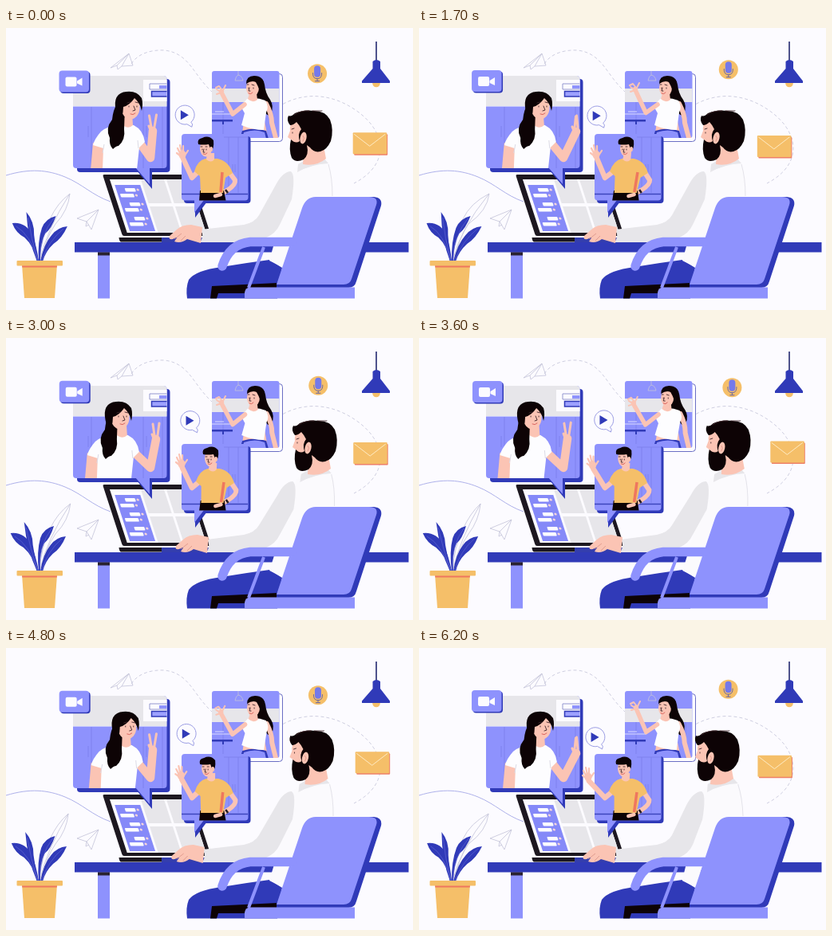
Write an HTML page that moves like this. It is 510 by 354 pixels and loops after 6300 ms.

```html
<!DOCTYPE html>
<html lang="en">
<head>
<meta charset="utf-8">
<title>Video call</title>
<style>
html, body { margin: 0; width: 100%; height: 100%; overflow: hidden; background: #fcfbff; }
svg { display: block; width: 510px; height: 354px; }
.lilac { fill: #8e92fd; }
.navy { fill: #303ab8; }
.grey { fill: #e7e6ea; }
.white { fill: #fcfbff; }
.skin { fill: #fbc4b4; }
.hair { fill: #0d0305; }
.gold { fill: #f5bf69; }
.line { fill: none; stroke: #c3c3d8; stroke-width: .8; }
.dash { stroke-dasharray: 4 3; }
.seam { fill: none; stroke: #7b7fea; stroke-width: .8; }
.ink { fill: none; stroke: #40262b; stroke-width: .9; stroke-linecap: round; }
.limb { fill: none; stroke: #fbc4b4; stroke-linecap: round; stroke-linejoin: round; }
.mouth { fill: none; stroke: #db655f; stroke-width: 1; stroke-linecap: round; }
</style>
</head>
<body>
<svg viewBox="0 0 510 354">
  <defs>
    <clipPath id="clipA"><path d="M80 50H210V176H80Z"/></clipPath>
    <clipPath id="clipB"><path d="M250 50H350V138H250Z"/></clipPath>
    <clipPath id="clipC"><path d="M195 130H310V216.500H195Z"/></clipPath>
  </defs>

  <!-- trails and paper planes -->
  <path d="M0 185C30 176 52 178 74 187S108 210 131 218" fill="none" stroke="#aeb1ea"/>
  <path class="line dash" d="M157 45C165 32 182 27 199 28C230 32 234 58 258 80"/>
  <path class="line dash" d="M341 99C374 78 409 84 435 101C476 127 484 170 436 195"/>
  <path class="line" d="M131 50L154 32L159 47L145 48L140 52L139 47ZM139 47L154 32L145 48"/>
  <path class="line" d="M89 239L116 228L107 253L101 243ZM101 243L116 228M101 243L100 249L104 247"/>

  <!-- lamp -->
  <circle class="gold" cx="464" cy="69.500" r="4.800"/>
  <path d="M464 17V41" stroke="#303478" stroke-width="1.700"/>
  <path class="navy" d="M459.500 42Q464 38 469 42V51L481 66.500V69H446V66.500L459.500 51Z"/>

  <!-- floating icons -->
  <g id="mic">
    <circle class="gold" cx="390" cy="57" r="12"/>
    <rect x="386" y="47" width="8" height="14.500" rx="4" fill="#7479ea"/>
    <path d="M384.500 56V58Q385 63.500 390 63.500T395.500 58V56M390 63.500V66.500M387 66.500H393" fill="none" stroke="#5c5da8" stroke-width=".9"/>
  </g>
  <g id="mail">
    <rect x="436" y="133" width="42" height="26.500" rx="1" fill="#ee8068"/>
    <rect class="gold" x="434.500" y="131" width="42.500" height="27" rx="1"/>
    <path d="M436 133L455.500 148L475 133" fill="none" stroke="#fff0cd" stroke-width=".9"/>
  </g>

  <!-- laptop -->
  <g transform="translate(0 184) skewX(18)">
    <rect x="121" width="111" height="77" rx="2" fill="#1d1820"/>
    <rect class="white" x="128" y="6" width="99" height="67"/>
    <rect x="132" y="13" width="32" height="58" fill="#8589f8"/>
    <path class="grey" d="M167 6H196V36H167ZM199 6H227V36H199ZM167 40H196V73H167ZM199 40H227V73H199Z"/>
    <g id="chat"></g>
  </g>

  <!-- left call -->
  <rect class="navy" x="89" y="64" width="116.500" height="117" rx="4"/>
  <path class="navy" d="M163 178H183V202Z"/>
  <rect class="lilac" x="84" y="60" width="117.500" height="116" rx="4"/>
  <path class="lilac" d="M162 175H180V196Z"/>
  <path class="grey" d="M84 64Q84 60 88 60H197.500Q201.500 60 201.500 64V98.500H84Z"/>
  <path class="white" d="M172 65H201.500V92H172Z"/>
  <path d="M180 70H201.500M180 70V77H201.500" stroke="#9497cf" fill="none"/>
  <path class="lilac" d="M192 72H201.500V76H192Z"/>
  <path d="M201.500 79.500H182.500V86H201.500" fill="#9da1ff" stroke="#303ab8" stroke-width="1.500"/>
  <path d="M84 98.500H201" stroke="#c5c8ff"/>
  <path class="seam" d="M107 99V176M172 99V176M196 99V176M103 123V137M176 123V137"/>
  <g clip-path="url(#clipA)">
    <path id="armA" class="limb" stroke-width="10.500"/>
    <path id="fingersA" class="limb" stroke-width="3"/>
    <g id="torsoA">
      <path class="skin" d="M109 144L123 148L122 178H106Z"/>
      <path fill="#fdfdff" d="M145 120Q127 123 119 130Q111 139 109 147L122 151L121 178H164L167 150L174 143Q172 128 160 122Z"/>
      <path d="M123 146L121 157M166 151L165 141" stroke="#dcdbe5" fill="none"/>
      <path class="skin" d="M145 107H158L159 122Q153 128 145 121Z"/>
    </g>
    <path id="tailA" class="hair" d="M140 93Q134 103 133 115Q124 126 130 138Q129 147 134 152Q138 148 141 148Q150 140 148 127Q148 113 150 99Z"/>
    <g id="headA">
      <ellipse class="skin" cx="156" cy="100" rx="11.500" ry="14.500"/>
      <path class="hair" d="M139 109Q132 85 147 80.500Q163 77 170 88Q172 95 170 104Q168 94 161 88Q155 97 147 99Q147 106 145 112Z"/>
      <path class="ink" d="M152 94L156 93M162 93L166 94M154 98V99M164 98V99M160 98L162 103L159 104"/>
      <path class="mouth" d="M156 108Q159 110 162 107"/>
    </g>
  </g>
  <g id="cam">
    <rect class="navy" x="67.500" y="54.500" width="37.500" height="27" rx="4"/>
    <rect class="lilac" x="66" y="53" width="37.500" height="27" rx="4"/>
    <rect class="white" x="74" y="61" width="14" height="12" rx="2"/>
    <path class="white" d="M88.500 66L95 62V72L88.500 69Z"/>
  </g>

  <g id="play">
    <path fill="#fcfbff" stroke="#9092e0" stroke-width=".9" d="M232 117Q235 119 233 123L227 119.500A12 12 0 1 1 232 117Z"/>
    <path class="navy" d="M219 102L229 108L219 114Z"/>
  </g>

  <!-- right call -->
  <rect x="262.500" y="57.500" width="84" height="85" rx="4" fill="#fcfbff" stroke="#6a6ec4"/>
  <rect class="lilac" x="258" y="54" width="84.500" height="84" rx="3"/>
  <path class="grey" d="M258 76H342.500V93H258Z"/>
  <path class="seam" d="M272 93V138M334 93V138"/>
  <path class="line" d="M291 54V59M287 66Q288 60 291 59Q296 60 297 66Z"/>
  <path d="M258 108H285M262 105H273" stroke="#dbdcff" fill="none"/>
  <path class="navy" d="M258 115H284V117.500H273V121H271V117.500H258Z"/>
  <g clip-path="url(#clipB)">
    <path id="hairB" class="hair" d="M311 63Q322 59 324 71Q325 82 331 90Q336 98 332 107Q328 114 323 102L311 89Z"/>
    <g id="torsoB">
      <path class="limb" stroke-width="6" d="M326 95Q333 108 333 119L338 138"/>
      <path class="skin" d="M298 117H324L327 132H296Z"/>
      <path class="navy" d="M296 129Q311 124 326 129L329 139H293Z"/>
      <path class="lilac" d="M298 131Q312 126 324 131L326 139H296Z"/>
      <path fill="#fdfdff" d="M302 89Q313 86 325 91Q330 99 326 106L323 128Q309 128 295 122L299 107L294 98Z"/>
      <path class="skin" d="M305 82H314L315 90Q309 95 303 89Z"/>
    </g>
    <path id="armB" class="limb" stroke-width="5.500"/>
    <g id="palmB">
      <circle class="skin" cx="270" cy="80" r="3.200"/>
      <path class="limb" stroke-width="2" d="M271 78L267 73L263 75M270 81L264 77M270 81L264 83M272 78L275 72"/>
    </g>
    <g id="headB">
      <ellipse class="skin" cx="309" cy="75" rx="8" ry="11"/>
      <path class="hair" d="M301 70Q301 60 311 60Q323 60 323 72L319 88Q319 78 313 68Q308 65 301 70Z"/>
      <path class="ink" stroke-width=".8" d="M302 71H304M308 71L311 72M304 75V76M310 75V76M305 75L304 79H306"/>
      <path class="mouth" d="M304 82Q307 84 309 81"/>
    </g>
  </g>

  <!-- middle call -->
  <rect class="navy" x="223" y="136" width="83.500" height="84" rx="4"/>
  <path class="navy" d="M237 218H252L237 238Z"/>
  <rect class="lilac" x="220" y="133" width="83.500" height="83.500" rx="4"/>
  <path class="lilac" d="M236 216H248L236 232Z"/>
  <path class="seam" d="M273 137H303M279 137V207M291 137V207M284 171V181M287 171V181"/>
  <path d="M220 208.500H303" stroke="#3d45bd" stroke-width="1.500"/>
  <g clip-path="url(#clipC)">
    <path id="armC" class="limb" stroke-width="6.500"/>
    <g id="palmC">
      <ellipse class="skin" cx="221" cy="159" rx="4.500" ry="5.500"/>
      <path class="limb" stroke-width="2.200" d="M218 157L215 151M220 156L218 147M222 156L222 148M224 160L228 154M218 160L214 157"/>
    </g>
    <g id="torsoC">
      <path class="limb" stroke-width="6" d="M279 180L287 191Q288 197 277 204L266 210"/>
      <path class="hair" d="M243 204H273L276 219H242Z"/>
      <path class="gold" d="M250 164Q240 166 236 180L243 186L244 207H272L275 188L284 182Q279 167 265 164Z"/>
      <path d="M271 181L269 206" stroke="#ef775e" stroke-width="3.500"/>
      <path class="skin" d="M252 157H261V165Q257 170 251 165Z"/>
      <path class="limb" stroke-width="4.500" d="M262 211L269 209"/>
      <path d="M275 203L278 207" stroke="#231d27" stroke-width="2.500"/>
    </g>
    <g id="headC">
      <ellipse class="skin" cx="250.500" cy="151" rx="7.500" ry="10.500"/>
      <path class="hair" d="M241 146Q239 139 246 138Q254 134 260 141Q261 151 257 155L254 146Q247 147 241 146Z"/>
      <ellipse class="skin" cx="257" cy="152" rx="2" ry="3"/>
      <path class="ink" stroke-width=".8" d="M244 149H246M250 149H252M246 152V153M251 152V153M248 152L247 156H249"/>
      <path class="mouth" d="M247 158Q250 160 252 157"/>
    </g>
  </g>

  <!-- plant -->
  <path id="leafLine" class="line"/>
  <g id="leaves" class="navy">
    <path d="M39 293Q35 273 24 263Q13 257 9 245Q26 243 34 260Q39 274 41 293Z"/>
    <path d="M39 293Q28 266 27 231Q37 243 36 260Q37 277 41 293Z"/>
    <path d="M41 293Q40 268 46 251Q51 239 64 236Q58 252 50 258Q43 270 43 293Z"/>
    <path d="M43 293Q48 271 58 260Q66 250 78 249Q71 264 60 271Q50 280 46 293Z"/>
    <path d="M14 249Q31 259 40 292M29 238Q32 264 40 292M61 239Q44 259 42 292M73 252Q54 267 45 292" fill="none" stroke="#6469d6" stroke-width=".6"/>
  </g>
  <path class="gold" d="M20 297H64L61 339H23Z"/>
  <path fill="#ef765f" d="M20 297H64L63.800 300.500H20.300Z"/>
  <rect class="gold" x="13.500" y="292" width="57.500" height="6.500" rx="1"/>

  <!-- desk -->
  <path class="lilac" d="M115 281H130V339.500H115Z"/>
  <path class="navy" d="M86 269H504.500V281.500H86Z"/>
  <path fill="#2a2230" d="M115 281.500H130V285.500H115Z"/>
  <path fill="#1d1820" d="M141.500 263H195V268.500H144Q142 268 141.500 263Z"/>
  <path fill="#343eae" d="M195 263H256V269H195Z"/>

  <!-- host -->
  <path class="navy" d="M346 301L330 291Q300 295 270 300Q238 304 229 316Q225 326 227 339.500H340Z"/>
  <path class="hair" d="M258 324L340 320V326H304V333H266L264 339.500H256Z"/>
  <g id="body">
    <path fill="#fbfafd" d="M360 178Q380 162 403 168Q409 183 409 217L370 240L346 300L330 292L345 238Z"/>
    <path class="grey" d="M366 171L376 165L398 163L404 170Q383 171 365 181Z"/>
    <path d="M404 171Q409 188 409 211" fill="none" stroke="#e4e3ea"/>
  </g>
  <path id="sleeve" class="grey"/>
  <g id="hand">
    <path class="skin" d="M246 250L232 247Q220 247 214 253L205 261Q203 266 209 265L215 262L211 268Q219 271 227 265L244 270Z"/>
    <path d="M211 265L220 258M219 267L225 261" stroke="#db9387" fill="none" stroke-width=".8"/>
  </g>
  <g id="head">
    <path class="skin" d="M374 143H397L401 164Q389 174 372 171Z"/>
    <path class="skin" d="M360 115Q355 122 356 129L353 137L357 140V153H380V115Z"/>
    <path class="hair" d="M356 122Q351 116 354 110Q357 112 362 107Q373 102 386 104Q400 104 406 115Q411 128 407 142Q402 153 394 155Q386 157 381 150L377 147Q380 159 373 165Q363 170 358 163Q354 153 357 140Q363 146 368 142Q365 133 370 127Q367 121 364 118Q360 122 356 122Z"/>
    <ellipse class="skin" cx="372.500" cy="138" rx="4" ry="7.500" transform="rotate(12 372.500 138)"/>
    <path class="ink" d="M358 127L361 126M359 131V132"/>
    <path d="M372 135Q375 138 372 142" fill="none" stroke="#dd9689" stroke-width=".9"/>
    <path class="ink" stroke="#0d0305" d="M361 109Q370 103 380 104M384 104L396 104"/>
  </g>

  <!-- chair -->
  <path class="navy" d="M392 212H461Q472 213 470 223L439 318Q437 326 429 326H339V318Z"/>
  <path class="lilac" d="M388 212H455Q467 212 464 222L433 315Q431 322 423 322H339L371 226Q376 212 388 212Z"/>
  <path d="M304 326L323 275" stroke="#8e92fd" stroke-width="4"/>
  <path d="M271 299Q280 271 306 268.500H358" fill="none" stroke="#8e92fd" stroke-width="11.500" stroke-linecap="round"/>
  <path class="lilac" d="M306 325.500H437V339.500H299V332Q300 325.500 306 325.500Z"/>
</svg>

<script>
const LOOP = 6300, CYCLE = 5100, STEP = 100;
const times = [0, 300, 800, 1100, 1700, 3000, 4200];
const keys = {
  head: [0, -4, -9, -7, 0, 6, 6],
  hand: [0, 0, 0, 1, 2, 8, 8],
  headA: [0, 2, -1, -2, -4, -13, -12],
  handAx: [184, 186, 195, 197, 197, 188, 185],
  handAy: [124, 125, 127, 127, 125, 122, 121],
  spread: [4.5, 3.5, 3, .5, .5, 4, 4],
  headB: [0, 0, -1, -1, 0, 1, 3],
  palmBx: [0, 0, 1, 2, 1, 0, -2],
  palmBy: [0, 0, -4, -5, -3, 1, 2],
  headC: [0, -1, 2, 6, 9, 6, 6],
  palmCx: [0, -1, -10, -9, 1, -1, -5],
  palmCy: [0, -3, 5, 3, 0, -1, 2]
};
const $ = id => document.getElementById(id);
const move = (id, x, y = 0) => $(id).setAttribute('transform', `translate(${x} ${y})`);
const draw = (id, d) => $(id).setAttribute('d', d);
// Shears a part sideways while its foot stays put.
const lean = (id, foot, k) => $(id).setAttribute('transform', `matrix(1 0 ${-k} 1 ${foot * k} 0)`);

// Periodic Hermite curve through the pose values.
function curve(v, p) {
  const n = times.length, idx = i => (i + n) % n;
  const time = i => times[idx(i)] + Math.floor(i / n) * CYCLE;
  const slope = i => (v[idx(i + 1)] - v[idx(i - 1)]) / (time(i + 1) - time(i - 1));
  let i = n - 1;
  while (times[i] > p) i--;
  const h = time(i + 1) - time(i), u = (p - time(i)) / h;
  const a = v[i], b = v[idx(i + 1)], e = u * u * (3 - 2 * u);
  return a + (b - a) * e + h * u * (1 - u) * (slope(i) * (1 - u) - slope(i + 1) * u);
}

function render(t) {
  const p = t % CYCLE, k = {};
  for (const name in keys) k[name] = curve(keys[name], p);
  const swing = peak => Math.cos((p - peak) / CYCLE * 2 * Math.PI);

  const mail = swing(4025), mic = swing(3850), play = swing(3500);
  move('mail', 9 * mail - 2, 1 - 3 * mail);
  move('mic', 2.5 * mic, 5.5 * mic);
  move('play', 2 + 5.5 * play, -.5 - 4.5 * play);
  move('cam', .5 + .5 * mic, .5 + .5 * mic);

  lean('leaves', 293, (-1.5 - 2.5 * swing(3700)) / 45);
  const tip = 82 - 6 * swing(4100);
  draw('leafLine', `M42 293Q44 262 55 240Q64 220 ${tip} 208Q${tip - 2} 229 62 246Q50 263 44 293M42 293Q51 253 ${tip} 208`);

  move('head', k.head);
  lean('body', 300, k.head / 210);
  move('hand', k.hand);
  const w = 244 + k.hand, s = k.head * .4;
  draw('sleeve', `M${357 + s} 180Q${347 + s} 180 ${338 + s} 197L317 235Q312 244 298 247L${w} 253Q${w + 5} 261 ${w - 1} 269H292Q333 269 343 247L${358 + s} 215Q${363 + s} 184 ${357 + s} 180Z`);

  const sway = k.headA * .55;
  move('headA', k.headA);
  move('tailA', k.headA * .7);
  move('torsoA', sway);
  const x = k.handAx, y = k.handAy, f = k.spread;
  draw('armA', `M${166 + sway} 142L181 163L${x} ${y + 5}`);
  draw('fingersA', `M${x - 2} ${y}L${x - f} ${y - 14}M${x + 2} ${y}L${x + f} ${y - 15}M${x - 3} ${y + 4}L${x - 5} ${y - 1}`);

  move('headB', k.headB);
  move('hairB', k.headB);
  lean('torsoB', 138, k.headB / 70);
  move('palmB', k.palmBx, k.palmBy);
  draw('armB', `M${299 + k.headB / 2} 96L${284 + k.palmBx * .3} ${108 + k.palmBy * .5}L${271 + k.palmBx} ${83 + k.palmBy}`);

  move('headC', k.headC);
  lean('torsoC', 217, k.headC / 110);
  move('palmC', k.palmCx, k.palmCy);
  draw('armC', `M${244 + k.headC * .4} 177L233 188L${222 + k.palmCx} ${164 + k.palmCy}`);
}

// Chat bubbles on the laptop.
$('chat').innerHTML = [0, 1, 2, 3, 4, 5].map(i => {
  const px = i % 2 ? 135 : 143, py = 17 + i * 7 + (i > 1) * 4 + (i > 3) * 4;
  const wide = i % 2 ? 17 : 13;
  return `<rect class="white" x="${px}" y="${py}" width="${wide}" height="4.500" rx="1"/>` +
    `<circle cx="${px + wide + 3}" cy="${py + 2}" r="1.600" fill="#f7d5da"/>`;
}).join('');

function tick() {
  render(Math.floor(performance.now() % LOOP / STEP) * STEP);
  requestAnimationFrame(tick);
}
tick();
</script>
</body>
</html>
```
